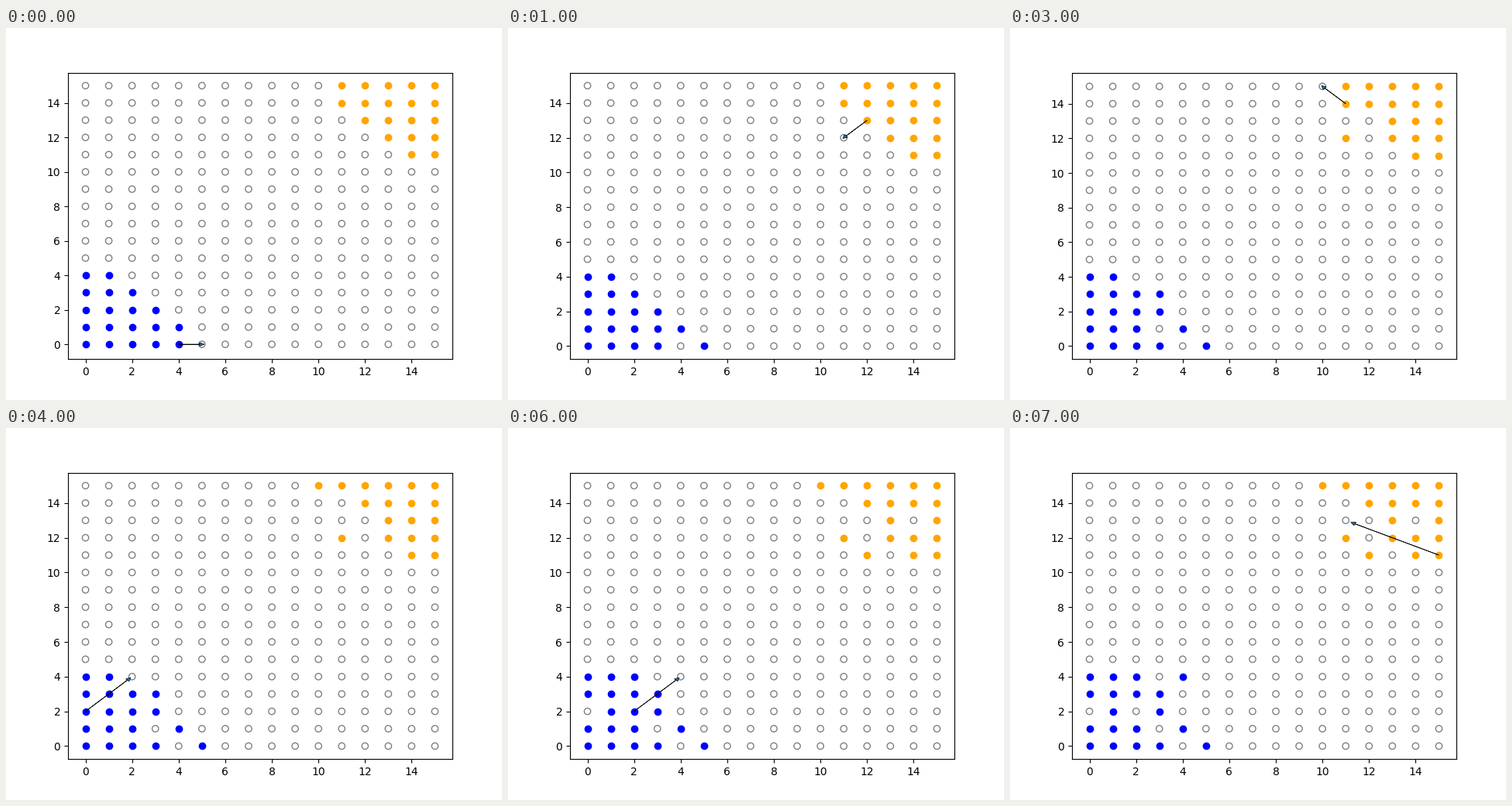
Animation, 640 px wide and 480 px high, one loop 8000 ms. Source, as a matplotlib script:

```python
import matplotlib.pyplot as plt
from matplotlib.animation import FuncAnimation

SIZE = 16
CAMP = 5

# Blue and orange alternate, blue first: (start, end).
MOVES = [
    ((4, 0), (5, 0)),
    ((12, 13), (11, 12)),
    ((3, 1), (3, 3)),
    ((11, 14), (10, 15)),
    ((0, 2), (2, 4)),
    ((14, 13), (12, 11)),
    ((2, 2), (4, 4)),
    ((15, 11), (11, 13)),
]

CELLS = [(x, y) for x in range(SIZE) for y in range(SIZE)]


def start_board():
    """Fill two opposite corner camps, mirrored through the centre."""
    board = {}
    for x in range(CAMP):
        for y in range(CAMP):
            if x + y <= CAMP:
                board[x, y] = "blue"
                board[SIZE - 1 - x, SIZE - 1 - y] = "orange"
    return board


def board_before(turn):
    board = start_board()
    for start, end in MOVES[:turn]:
        board[end] = board.pop(start)
    return board


def draw_arrow(start, end):
    (x0, y0), (x1, y1) = start, end
    ax.arrow(x0, y0, 0.9 * (x1 - x0), 0.9 * (y1 - y0),
             head_width=0.2, head_length=0.2, linewidth=0.5)


def draw(turn):
    ax.clear()
    board = board_before(turn)
    empty = [c for c in CELLS if c not in board]
    ax.scatter(*zip(*empty), facecolors="none", edgecolors="gray")
    for color in ("blue", "orange"):
        pieces = [c for c in CELLS if board.get(c) == color]
        ax.scatter(*zip(*pieces), color=color)
    draw_arrow(*MOVES[turn])


fig, ax = plt.subplots(figsize=(6.4, 4.8), dpi=100)
anim = FuncAnimation(fig, draw, frames=len(MOVES), interval=1000,
                     init_func=lambda: draw(0), repeat=True)
plt.show()
```
